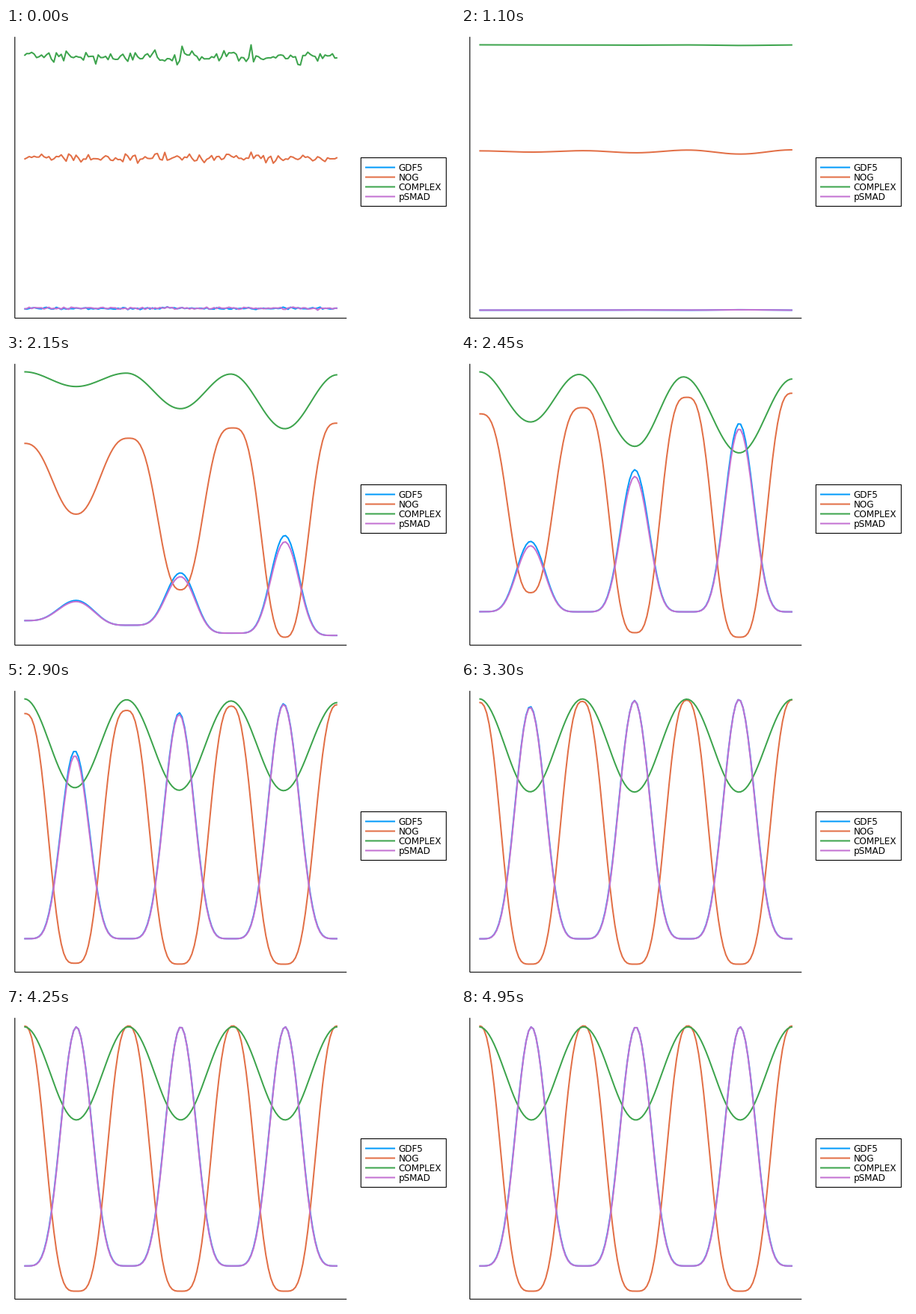
Animation, 600 px wide and 400 px high, one loop 5.05 s. Source, as a matplotlib script:

```python
import numpy as np
import matplotlib.pyplot as plt
from matplotlib.animation import FuncAnimation
from matplotlib.patches import Rectangle

W, H, DPI = 600, 400, 100
PX = 72 / DPI                       # one pixel in points
TICKS, STATES, POINTS = 101, 88, 128
PAD = 11.81                         # 3 mm around the axes
TOP, BOTTOM = 22.5, 377.5
LEFT, RIGHT = 24.4, 442.8

SPECIES = [("GDF5", "#009AFA"), ("NOG", "#E26F46"),
           ("COMPLEX", "#3DA44D"), ("pSMAD", "#C371D2")]
GDF0, NOG0, CPLX0 = 0.225, 0.762, 1.125      # uniform starting levels

# The pattern ripens from right to left: midpoints of each logistic rise.
TROUGH_MID = np.array([47.4, 42.8, 40.0])
CREST_MID = np.array([43.3, 42.2, 40.3, 39.5])
CPLX_MID = 43 + 1.3 * np.arange(4)

x = np.linspace(LEFT, RIGHT, POINTS)


def logistic(k, mid, rate):
    return 1 / (1 + np.exp(-rate * (k - mid)))


def bump(k, mid, width):
    return np.exp(-((k - mid) / width) ** 2)


def wave(turns, crests, troughs, shape):
    """Join crests and troughs; shape turns nearness to a trough into depth."""
    seg = np.clip(np.searchsorted(turns, x, side="right") - 1, 0, 5)
    t = (x - turns[seg]) / (turns[seg + 1] - turns[seg])
    near = np.cos(np.pi / 2 * np.where(seg % 2, t, 1 - t)) ** 2
    crest, trough = crests[(seg + 1) // 2], troughs[seg // 2]
    return crest + (trough - crest) * shape(near, seg // 2)


rng = np.random.default_rng(5)
levels = np.array([GDF0, NOG0, CPLX0, GDF0])
noise = 0.01 * levels[:, None] * rng.normal(size=(4, POINTS))
noise[2, [64, 92]] = 0.037, 0.042            # two tall spikes
modes = np.arange(POINTS)
basis = np.cos(np.pi * modes[:, None] * (modes + 0.5) / POINTS)
spectrum = noise @ basis.T * 2 / POINTS
spectrum[:, 0] /= 2


def diffused_noise(k):
    return (spectrum * np.exp(-(0.003 * modes ** 2 + 0.12) * k)) @ basis


def curves(k):
    p = logistic(k, TROUGH_MID, 0.31)        # troughs
    e = logistic(k, CREST_MID, 0.205)        # crests

    turns = np.linspace(LEFT, RIGHT, 7)
    turns[1:-1] -= 2.2 * bump(k, 52, 12)
    cplx_turns = turns.copy()
    cplx_turns[[2, 4]] -= 5 * bump(k, 42, 6)

    gdf_low = 0.12 + 0.105 * np.exp(-(e / 0.28) ** 3)
    gdf_peak = GDF0 + 1.02 * p
    smad_peak = gdf_peak - 0.12 * p * (1 - p)
    nog_high = NOG0 + 0.488 * e
    nog_low = NOG0 * np.exp(-p / 0.155)
    cplx_high = CPLX0 + 0.12 * logistic(k, CPLX_MID, 0.3)
    cplx_low = CPLX0 - 0.33 * (1 - np.exp(-p / 0.3))

    # Exponents: sinusoids at first, then narrow peaks and flat valleys.
    onset = 1 - np.exp(-p / 0.07)
    sharp = 1 + 1.9 * onset - 0.55 * p ** 4
    steep = 1 + 0.7 * onset - 0.45 * p ** 3
    blunt = 1 + 0.95 * p ** 0.6

    y = np.array([
        wave(turns, gdf_low, gdf_peak, lambda c, j: c ** sharp[j]),
        wave(turns, nog_high, nog_low,
             lambda c, j: 1 - (1 - c ** steep[j]) ** blunt[j]),
        wave(cplx_turns, cplx_high, cplx_low, lambda c, j: c),
        wave(turns, gdf_low, smad_peak,
             lambda c, j: c ** (sharp[j] + 0.05 * p[j])),
    ]) + diffused_noise(k)
    lo, hi = y.min(), y.max()
    return BOTTOM - (y - lo) * (BOTTOM - TOP) / (hi - lo)


def state_at(tick):
    """29 states are spread over every 33 ticks."""
    return (29 * tick + 1) // 33


states = [curves(k) for k in range(STATES)]

fig = plt.figure(figsize=(W / DPI, H / DPI), dpi=DPI, facecolor="white")
ax = fig.add_axes([0, 0, 1, 1])
ax.set_xlim(0, W)
ax.set_ylim(H, 0)
ax.axis("off")


def stroke(xs, ys, color, width, **kw):
    return ax.plot(xs, ys, color=color, lw=width * PX, snap=False,
                   solid_capstyle="butt", solid_joinstyle="round", **kw)[0]


stroke([PAD, PAD], [PAD, H - PAD], "black", 1.1)
stroke([PAD, 455.2], [H - PAD, H - PAD], "black", 1.1)
lines = [stroke(x, y, color, 2)
         for (_, color), y in zip(SPECIES, states[0])]

ax.add_patch(Rectangle((474.3, 173.6), 114, 64.9, fc="white", ec="black",
                       lw=1.1 * PX, snap=False, zorder=3))
for row, (name, color) in enumerate(SPECIES):
    y = 186.5 + 13 * row
    stroke([480, 520], [y, y], color, 2, zorder=4)
    ax.text(524.6, y + 4.5, name, family="DejaVu Sans", size=12 * PX,
            color="black", va="baseline", zorder=4)


def draw(tick):
    for line, y in zip(lines, states[state_at(tick)]):
        line.set_ydata(y)
    return lines


anim = FuncAnimation(fig, draw, frames=TICKS, interval=50, repeat=True)
plt.show()
```
